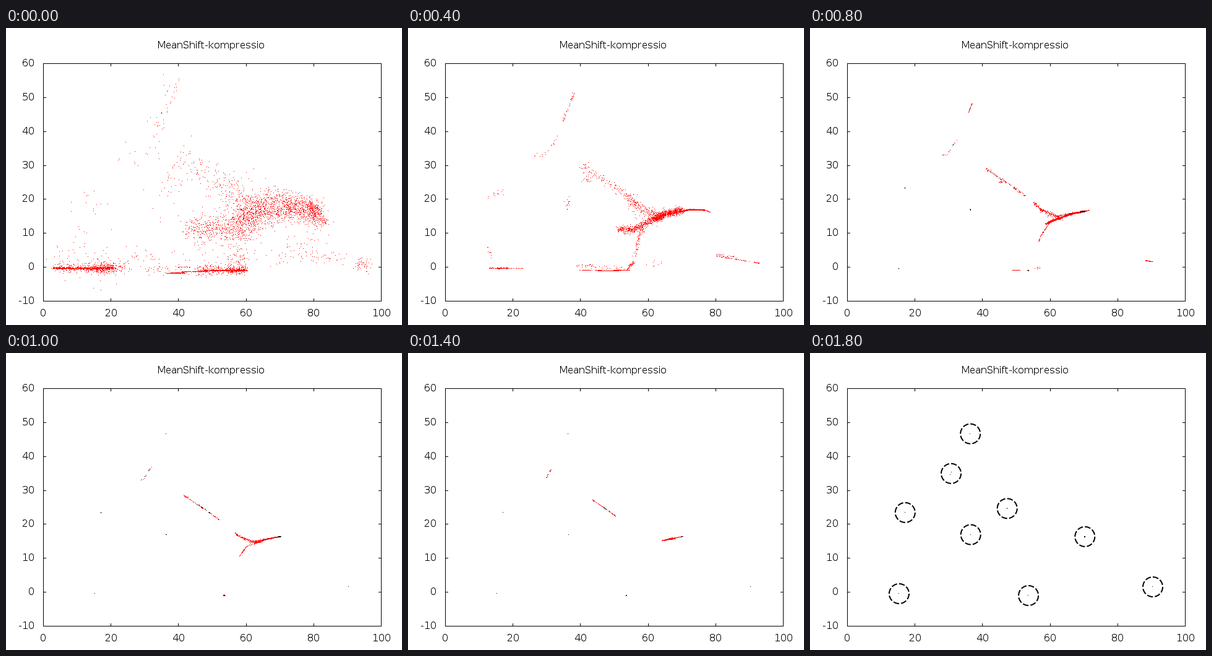
A matplotlib script for the animation above (2.8 s loop, 640 by 480 pixels).

```python
import numpy as np
import matplotlib.pyplot as plt
from matplotlib.animation import FuncAnimation
from matplotlib.patches import Circle

W, H, DPI = 640, 480, 80
PX = 72 / DPI                      # one pixel in points
LEFT, RIGHT, TOP, BOTTOM = 60, 606, 57, 441
LAST_STEP = 9

# Modes that the points climb to
BASE, MID, MAIN, TAIL = (15.2, -.4), (53.5, -.95), (70.2, 16.4), (90.3, 1.6)
SLOPE, PEAK, ARC = (47.2, 24.7), (36.3, 46.7), (30.6, 35)
WEST, CENTRE = (17, 23.5), (36.4, 17)
MODES = [BASE, MID, MAIN, TAIL, SLOPE, PEAK, ARC, WEST, CENTRE]

rng = np.random.default_rng(7)
steps = np.arange(LAST_STEP + 1)[:, None]


def to_px(x, y):
    return LEFT + 5.46 * x, 386.1 - 5.486 * y


def flow(n, spread, duration, *ridge, span=(0, 1), lift=(0, 0), settle=.4,
         ease=1):
    """Points around a ridge that slide along it to the mode at its end.

    `span` is the part of the ridge, counted from the mode, that is filled at
    first. Offsets from the ridge shrink by `settle` with every step.
    """
    ridge = np.array(ridge, float)
    lengths = np.linalg.norm(np.diff(ridge, axis=0), axis=1)
    along = np.concatenate([[0], lengths.cumsum()]) / lengths.sum()
    start = rng.uniform(*span, n)
    left = np.clip(1 - (steps / duration) ** ease, 0, 1)
    done = 1 - start * left
    offset = rng.normal(size=(n, 2)) * spread + lift
    on_ridge = np.stack([np.interp(done, along, c) for c in ridge.T], axis=-1)
    return on_ridge + offset * settle ** steps[:, :, None]


INFLOW = [(60, 13.4), (66, 15.6), MAIN]
DESCENT = [(53, 20.5), (57.5, 16.6), (62, 14.7), (66, 15.6), MAIN]
CREST = [(84.5, 12.8), (80.3, 15.2), (77, 16.8), (72, 16.9), MAIN]

flows = [
    # left band on the base line, with scatter above it
    flow(450, (.3, .15), 2.1, (3, -.3), BASE, settle=.1),
    flow(220, (.3, .15), 3, (20.5, -.2), BASE, settle=.1, ease=2),
    flow(150, (2, .8), 2.1, (5, -.2), BASE, settle=.1),
    flow(260, (1.5, .8), 3, (21, -.2), BASE, settle=.1, ease=2),
    flow(45, (1, 1), 3.5, (27, -.3), BASE, settle=.15, ease=2),
    flow(25, (2, 3), 2.5, (4, 0), BASE, lift=(0, 1.5), settle=.15),
    flow(30, (3, 3.5), 3, (25, 0), BASE, lift=(0, 1.5), settle=.2),
    flow(9, (1.5, 2), 4, (9, 14), BASE, span=(.4, 1)),

    # middle band, with scatter above it
    *(flow(n, (.1, .05), 4, (36.5, -1.2), MID, span=span, lift=(0, lift),
           settle=.1)
      for n, span, lift in ((110, (.68, 1), -.6), (130, (.26, .74), -.2),
                            (200, (0, .35), 0), (25, (.6, .8), 1.15))),
    flow(200, (.2, .12), 2.4, (60.2, -1), MID, settle=.1),
    flow(170, (1, .7), 4, (46, -1), MID, settle=.1),
    flow(180, (.4, .7), 2.4, (60, -.6), MID, span=(.2, 1), settle=.15),
    flow(35, (1, .8), 5, (30, -.8), MID, span=(.5, 1), settle=.1),
    flow(45, (3, 2.5), 4, (24, 2), MID, lift=(0, 2)),
    flow(45, (2, 1.2), 4, (57.5, 4), MID, lift=(1, 0)),
    flow(8, (2, 1.5), 5, (73, 4), MID, span=(.4, 1), settle=.6),

    # large cloud on the right
    flow(60, (2, 1.5), 8, (55.5, 2), (57, 9), *INFLOW, span=(.6, 1),
         lift=(2, 0), ease=2),
    flow(520, (1.8, 2), 7, (43, 11.5), (56, 11), *INFLOW, span=(.3, 1),
         settle=.5),
    flow(650, (2.5, 2.4), 8, (59, 13), *INFLOW, lift=(0, 1.4), settle=.45),
    flow(600, (1.2, 1.9), 4.4, *CREST, span=(0, .8), lift=(0, .9), settle=.2),
    flow(150, (.9, 1), 4.4, *CREST, span=(.5, .75), lift=(0, 1.5), settle=.15),
    flow(80, (.7, .7), 4.4, *CREST, span=(.6, 1), settle=.15),

    # slope coming down from the upper middle
    flow(170, (3, 2.5), 8, *DESCENT, span=(.25, 1), lift=(1.5, 3.5),
         settle=.5, ease=3),
    flow(70, (3, 3.5), 8, *DESCENT, span=(.5, 1), lift=(1, -1), settle=.6,
         ease=2),
    flow(55, (3, 3), 9, (40.3, 29.3), SLOPE, lift=(1, 2), settle=.5, ease=3),
    flow(40, (2.5, 2.5), 9, (53, 20.5), SLOPE, lift=(1, 3.5), settle=.5,
         ease=3),
    flow(15, (3, 4), 5, (35, 27), SLOPE, span=(.5, 1), settle=.5),

    # right tail
    flow(55, (1.5, 1.3), 4.5, (72, 3), (80, 3.3), TAIL, lift=(0, .5),
         settle=.12),
    flow(25, (2, 2), 4.5, (72, 3), (80, 3.3), TAIL, span=(.4, 1),
         lift=(0, 3), settle=.35),
    flow(50, (.9, 1), 3.5, (96.5, .6), TAIL, span=(.4, 1), settle=.12),

    # arcs at the top
    flow(18, (1.3, 1.3), 5, (33, 41), (34.8, 43), PEAK, settle=.35),
    flow(18, (1.3, 1.3), 5, (39.3, 54), PEAK, settle=.35),
    flow(9, (1.8, 2.2), 9, (20, 32), (29.7, 33.2), (30.4, 34.7), ease=.6),
    flow(9, (1.8, 2.2), 9, (35, 41), (32.8, 37.8), (30.8, 35.4), ease=.6),

    # sparse points on the left and in the centre
    flow(14, (2, 4), 4, (8, 17), WEST),
    flow(14, (3, 4), 3.5, (36, 24), CENTRE),
]
points = np.concatenate(flows, axis=1)


def frame_image():
    """Axes box with inward ticks."""
    image = np.full((H, W, 3), 255, np.uint8)
    image[[TOP, BOTTOM], LEFT:RIGHT + 1] = 0
    image[TOP:BOTTOM + 1, [LEFT, RIGHT]] = 0
    for value in range(0, 101, 20):
        x = round(to_px(value, 0)[0])
        image[TOP:TOP + 5, x] = image[BOTTOM - 4:BOTTOM, x] = 0
    for value in range(-10, 61, 10):
        y = round(to_px(0, value)[1])
        image[y, LEFT:LEFT + 5] = image[y, RIGHT - 4:RIGHT] = 0
    return image


def dot_image(step):
    p = points[step]
    col, row = np.round(to_px(*p.T)).astype(int)
    inside = (col > LEFT) & (col < RIGHT) & (row > TOP) & (row < BOTTOM)
    # late on, dots that hardly move any more turn black
    moved = np.linalg.norm(p - points[max(step - 1, 0)], axis=1)
    black = (moved < .2) & (step >= 4)
    image = box.copy()
    for mask, colour in ((~black, (255, 0, 0)), (black, (0, 0, 0))):
        image[row[mask & inside], col[mask & inside]] = colour
    return image


def label(x, y, text, align="center"):
    ax.text(x, y, text, ha=align, va="baseline", fontsize=16 * PX,
            color="black")


plt.rcParams.update({"font.family": "DejaVu Sans", "text.hinting": "default",
                     "text.hinting_factor": 1})
box = frame_image()
fig = plt.figure(figsize=(W / DPI, H / DPI), dpi=DPI, facecolor="white")
ax = fig.add_axes([0, 0, 1, 1])
picture = ax.imshow(dot_image(0), extent=(0, W, H, 0), aspect="auto",
                    interpolation="nearest")
ax.set(xlim=(0, W), ylim=(H, 0))
ax.axis("off")

for value in range(0, 101, 20):
    label(to_px(value, 0)[0] + .5, 466, str(value))
for value in range(-10, 61, 10):
    label(46, round(to_px(0, value)[1]) + 5, str(value), "right")
label(332, 33, "MeanShift-kompressio")

rings = []
for mode in MODES:
    x, y = to_px(*mode)
    ring = Circle((x + 1, y + .7), 16, fill=False, ec="black", lw=2 * PX,
                  ls=(0, (4.7, 1.583)), visible=False)
    rings.append(ax.add_patch(ring))


def update(frame):
    step = min(frame, LAST_STEP)
    picture.set_data(dot_image(step))
    for ring in rings:
        ring.set_visible(step == LAST_STEP)
    return [picture, *rings]


anim = FuncAnimation(fig, update, frames=14, interval=200, repeat=True,
                     repeat_delay=0, blit=False)
plt.show()
```
